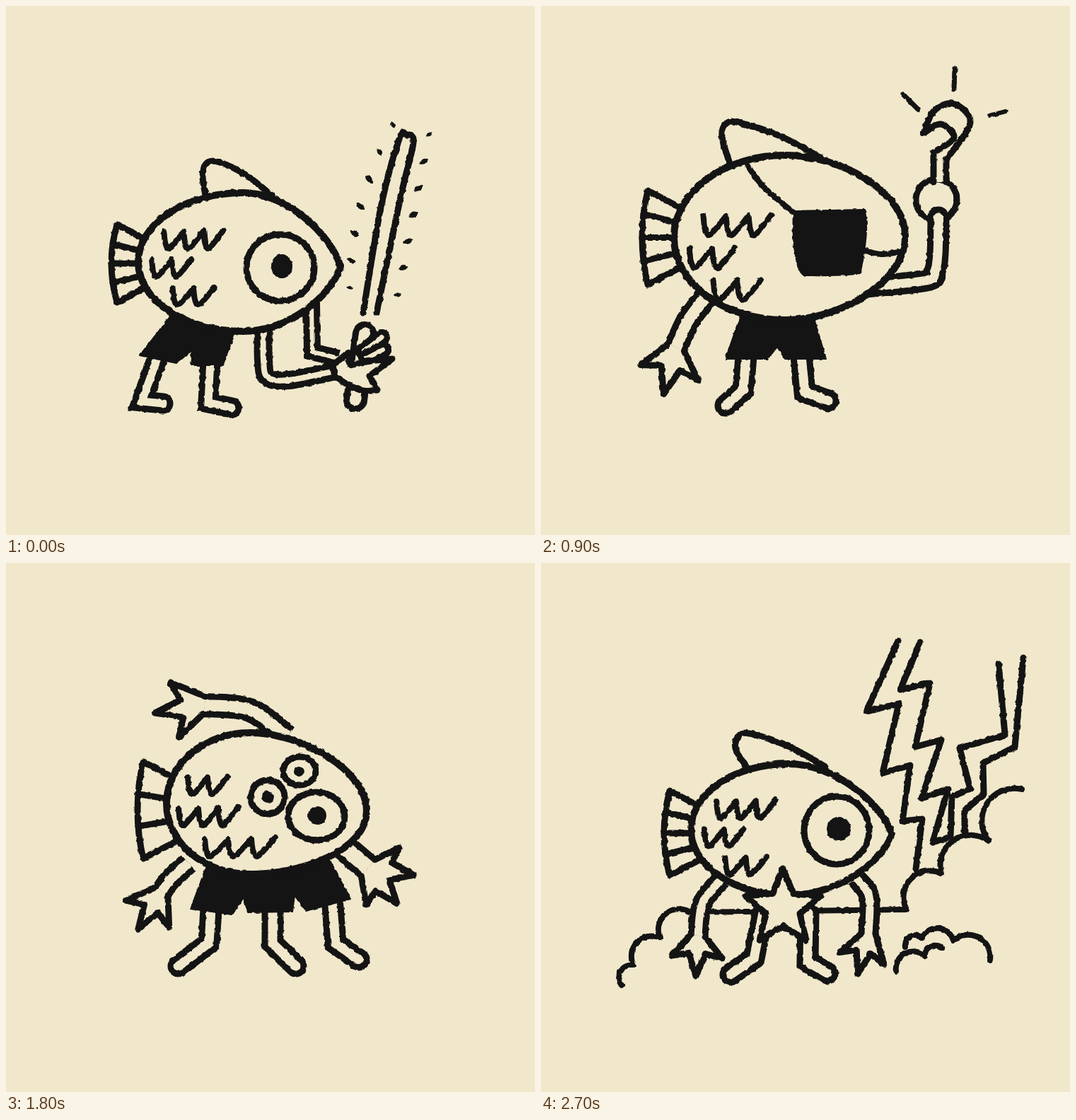
Recreate the animation shown at these times as an HTML page. Size 748 by 748 pixels, loop 3.15 s.

```html
<!DOCTYPE html>
<html lang="en">
<head>
<meta charset="utf-8">
<title>Fish poses</title>
<style>
html, body { margin: 0; width: 100%; height: 100%; overflow: hidden; background: #f1e8cc; }
svg { display: block; width: 100vw; height: 100vh; }
.pose { display: none; fill: none; stroke: #141414; stroke-width: 9; stroke-linecap: round; stroke-linejoin: round; }
</style>
</head>
<body>
<svg viewBox="0 0 748 748">
  <filter id="rough" filterUnits="userSpaceOnUse" x="0" y="0" width="748" height="748" color-interpolation-filters="sRGB">
    <feTurbulence type="fractalNoise" baseFrequency="0.17" numOctaves="1" seed="4"/>
    <feDisplacementMap in="SourceGraphic" scale="4" xChannelSelector="R" yChannelSelector="G"/>
  </filter>
  <g id="poses" filter="url(#rough)"></g>
</svg>
<script>
const HOLD = 450, INK = '#141414', PAPER = '#f1e8cc', LINE = 9;
const NS = 'http://www.w3.org/2000/svg';
const root = document.getElementById('poses');
const poses = [];
let group;

function add(tag, attrs) {
  const el = document.createElementNS(NS, tag);
  for (const k in attrs) el.setAttribute(k, attrs[k]);
  group.append(el);
}

const polar = (x, y, r, deg) => {
  const a = deg * Math.PI / 180;
  return [x + r * Math.cos(a), y + r * Math.sin(a)];
};
const corners = pts => pts.map(p => p.join() + '!').join(' ');

// Smooth path through points; "!" marks a sharp corner, a final "z" closes it.
function curve(text) {
  const words = text.split(' ');
  const closed = words[words.length - 1] === 'z';
  if (closed) words.pop();
  const pts = words.map(w => {
    const [x, y] = w.split(',').map(parseFloat);
    return { x, y, sharp: w.endsWith('!') };
  });
  const n = pts.length;
  const at = i => closed ? pts[(i + n) % n] : pts[Math.max(0, Math.min(n - 1, i))];
  let d = `M${pts[0].x} ${pts[0].y}`;
  for (let i = 0; i < (closed ? n : n - 1); i++) {
    const b = at(i), c = at(i + 1);
    const a = b.sharp ? b : at(i - 1), e = c.sharp ? c : at(i + 2);
    d += `C${b.x + (c.x - a.x) / 6} ${b.y + (c.y - a.y) / 6} ` +
      `${c.x - (e.x - b.x) / 6} ${c.y - (e.y - b.y) / 6} ${c.x} ${c.y}`;
  }
  return closed ? d + 'Z' : d;
}

const path = (d, width = LINE, fill = 'none') => add('path', { d, fill, 'stroke-width': width });
const ink = (text, width) => path(curve(text), width);
const shape = text => path(curve(text), LINE, PAPER);
const solid = text => path(curve(text), 2, INK);

// Hollow limb: a wide ink line with a narrower paper line inside.
function tube(text, w = 22, cap = 'round') {
  const d = curve(text);
  for (const [stroke, width] of [[INK, w + LINE], [PAPER, w - LINE]])
    add('path', { d, stroke, 'stroke-width': width, 'stroke-linecap': cap, 'stroke-linejoin': 'miter' });
}

function arm(text, r, dir, { w = 22, spread = 45, fingers = 3 } = {}) {
  tube(text, w, 'butt');
  const [[ax, ay], [x, y]] = text.split(' ').slice(-2).map(p => p.split(',').map(parseFloat));
  const heading = Math.atan2(y - ay, x - ax) * 180 / Math.PI;
  const pts = [polar(x, y, w / 2, heading + 90)];
  for (let i = 0; i < 2 * fingers - 1; i++) {
    const off = fingers - 1 - i;
    const reach = i % 2 ? 0.53 : 1.1 - 0.1 * Math.abs(off);
    pts.push(polar(x, y, r * reach, dir + off * spread / 2));
  }
  pts.push(polar(x, y, w / 2, heading - 90));
  shape(corners(pts));
}

function waves(x, y, step, n, h, width = 8) {
  let text = `${x},${y}`;
  for (let i = 0; i < n; i++, x += step)
    text += ` ${x + step * 0.08},${y + h * 0.75} ${x + step * 0.3},${y + h} ${x + step},${y - i}!`;
  ink(text, width);
}

function tail(x, top, bottom, rays = 3) {
  const half = (bottom - top) / 2, mid = top + half, hub = x + 1.9 * half;
  path(`M${hub} ${mid}L${x} ${top}Q${x - 16} ${mid} ${x} ${bottom}Z`);
  for (let i = 1; i <= rays; i++) {
    const t = i / (rays + 1);
    path(`M${x - 32 * t * (1 - t)} ${top + 2 * half * t}L${hub} ${mid}`);
  }
}

function fin(bx, by, px, py, ex, ey) {
  ink(`${bx},${by} ${px},${py + 20} ${px + 6},${py + 1} ${px + 24},${py} ` +
    `${(px + ex) / 2 + 12},${py * 0.62 + ey * 0.38} ${ex},${ey}`);
}

// Half ellipse behind `top`, tapering to the nose in front of it.
function body([x0, y0, x1, y1], top, nose, blunt) {
  const w = x1 - x0, h = y1 - y0, mid = (y0 + y1) / 2, k = 0.448;
  const bx = x0 + (top - x0) * k, fx = top + (x1 - top) * 0.45;
  const nx = blunt ? x1 : x1 - w * 0.05, ny = h * (blunt ? 0.28 : 0.23);
  path(`M${x0} ${mid}C${x0} ${y0 + h / 2 * k} ${bx} ${y0} ${top} ${y0}` +
    `C${fx} ${y0} ${nx} ${nose - ny} ${x1} ${nose}` +
    `C${nx} ${nose + ny} ${fx} ${y1} ${top} ${y1}` +
    `C${bx} ${y1} ${x0} ${y1 - h / 2 * k} ${x0} ${mid}Z`, 10, PAPER);
}

function fish(box, top, nose, scalesY, blunt) {
  body(box, top, nose, blunt);
  const x = box[0], w = box[2] - x, gap = w * 0.14, h = w * 0.08;
  waves(x + w * 0.127, scalesY, w * 0.098, 3, h);
  waves(x + w * 0.067, scalesY + gap, w * 0.098, 2, h);
  waves(x + w * 0.17, scalesY + 2 * gap, w * 0.103, 2, h);
}

function eye(cx, cy, rx, ry, px, py, prx, pry = prx) {
  add('ellipse', { cx, cy, rx, ry });
  add('ellipse', { cx: px, cy: py, rx: prx, ry: pry, fill: INK, 'stroke-width': 2 });
}

function spark(x, y, len, deg) {
  add('path', {
    d: `M${-len / 2} 0Q0 ${-len / 2} ${len / 2} 0Q0 ${len / 2} ${-len / 2} 0Z`,
    transform: `translate(${x} ${y}) rotate(${deg})`, fill: INK, 'stroke-width': 1
  });
}

// Row of cloud bumps, one arc between each pair of points.
function cloud(text) {
  const pts = text.split(' ').map(p => p.split(',').map(Number));
  path(pts.reduce((d, [x, y], i) => {
    if (!i) return `M${x} ${y}`;
    const r = Math.hypot(x - pts[i - 1][0], y - pts[i - 1][1]) * 0.53;
    return `${d}A${r} ${r} 0 0 1 ${x} ${y}`;
  }, ''), 8);
}

function star(x, y, r) {
  const pts = Array.from({ length: 10 }, (_, i) => polar(x, y, i % 2 ? r * 0.45 : r, i * 36 - 90));
  shape(corners(pts) + ' z');
}

function shoe(dx, dy) {
  const at = text => text.replace(/(\d+),(\d+)/g, (_, x, y) => `${+x + dx},${+y + dy}`);
  solid(at('334,508! 311,545 318,622! 338,588! 370,634 394,628 382,560 357,512! z'));
  add('path', { d: curve(at('346,506 347,535 354,556')), stroke: PAPER, 'stroke-width': 21 });
  tube(at('346,290 347,400 346,512'), 23, 'butt');
}

function pose(draw) {
  group = document.createElementNS(NS, 'g');
  group.setAttribute('class', 'pose');
  root.append(group);
  poses.push(group);
  draw();
}

// Glowing sword
pose(() => {
  tail(157, 309, 419);
  fin(283, 272, 278, 221, 376, 268);
  tube('214,498 192,559! 222,562', 20);
  tube('289,500 286,561! 319,568', 20);
  solid('236,434! 189,494! 241,505! 263,487! 261,508! 307,508! 326,455! z');
  tube('432,420 433,489! 470,498', 15, 'butt');
  tube('364,450 364,500 370,525 400,529 466,516', 17, 'butt');
  fish([187, 264, 473, 460], 335, 368, 319);
  eye(388, 370, 48, 47, 390, 368, 14, 16);
  tube('507,463 494,557', 25);
  tube('506,488 531,469', 15);
  tube('510,498 533,486', 15);
  shape('465,524! 462,508! 484,490! 486,508! 515,502 546,499! 514,523! 525,543! 505,544 483,535 z');
  ink('505,434 530,285 556,188 566,182 576,193 558,270 524,434');
  for (let i = 0; i < 7; i++) {
    const t = i / 6, len = 9 + 5 * Math.sin(Math.PI * t);
    spark(486 + 61 * t * t, 398 - 230 * t, len, 15 + 50 * t);
    spark(554 + 44 * t, 408 - 226 * t, len, -10 - 30 * t);
  }
});

// Merfolk
pose(() => {
  tail(254, 187, 313);
  fin(357, 178, 350, 124, 459, 170);
  shape('259,556 256,500 263,452! 284,500 296,556');
  shape('262,556 225,577 188,622! 250,613 298,589');
  shape('375,360! 372,480 345,545 278,560! 310,594 355,606 445,575 492,475 498,340! z');
  for (let i = 0; i < 6; i++)
    waves(391 - 1.9 * i * i, 393 + 34 * i, 22, i % 2 && i < 5 ? 1 : 2, 18);
  fish([286, 169, 560, 366], 417, 264, 228);
  eye(476, 267, 46, 48, 478, 265, 12, 16);
});

// Pirate
pose(() => {
  tail(151, 261, 394);
  fin(268, 226, 256, 165, 395, 214);
  tube('290,495 286,543! 261,565');
  tube('368,495 373,546! 406,558');
  solid('283,435! 261,499! 320,499! 334,482! 345,499! 403,499! 384,435! z');
  arm('236,408 208,445 191,483', 62, 105, { w: 25, spread: 49 });
  add('circle', { cx: 559, cy: 274, r: 29 });
  shape('555,249! 555,207! 584,186 565,167 541,180! 555,149 583,138 607,165 573,217! 573,249!');
  tube('450,398 545,388 557,375 561,350 562,299');
  fish([188, 211, 515, 444], 345, 326, 297, true);
  ink('292,226 315,256 358,293', 8);
  ink('455,345 480,351 506,348', 8);
  solid('357,296 363,290 410,289 458,288! 460,320 453,370 445,379 385,381 367,376 358,340 z');
  ink('585,88 584,118', 7);
  ink('512,125 533,146', 7);
  ink('634,155 657,149', 6);
});

// High heels
pose(() => {
  tail(239, 189, 289);
  fin(337, 156, 331, 115, 411, 158);
  arm('299,288 282,315 268,338', 49, 110, { w: 20, spread: 42 });
  arm('465,270 478,298 483,324', 49, 85, { w: 22, spread: 40 });
  shoe(0, 0);
  shoe(68, -8);
  fish([270, 152, 487, 304], 370, 240, 202);
  eye(414, 232, 41, 41, 415, 234, 11, 12);
});

// Three of everything
pose(() => {
  tail(194, 281, 418, 2);
  tube('290,490 287,537! 244,570');
  tube('377,490 377,538! 410,570');
  tube('462,485 466,538! 499,561');
  solid('283,430! 261,489! 320,497! 336,473! 342,494! 405,493! 408,470! 424,492! 487,475! 455,415! z');
  arm('398,246 345,208 280,201', 64, 171, { w: 25, spread: 43 });
  arm('258,424 232,448 220,465', 57, 122, { spread: 44 });
  arm('478,402 512,431', 65, 30, { w: 30, spread: 42, fingers: 4 });
  body([227, 240, 510, 440], 345, 350, true);
  waves(257, 303, 28, 2, 23);
  waves(244, 347, 28, 3, 23);
  waves(281, 391, 33, 3, 23);
  eye(415, 294, 23, 20, 414, 295, 6);
  eye(370, 331, 24, 24, 370, 331, 8);
  eye(439, 358, 40, 34, 440, 357, 12);
});

// Splashing drink
pose(() => {
  tail(202, 288, 424);
  fin(305, 252, 295, 200, 430, 249);
  tube('360,500 363,551! 400,539', 22, 'butt');
  shape('402,549! 420,590! 431,523! 397,530!');
  tube('455,437 510,428! 512,468', 22, 'butt');
  shape('524,460! 554,481! 498,506! 501,468!');
  solid('347,445! 327,503! 390,505! 400,472! 457,467! 475,425! z');
  shape('466,190! 440,188 419,180! 424,142 440,120 462,112! 518,152 505,186!');
  tube('508,294 538,250 541,235 507,190', 24, 'butt');
  shape('496,197! 466,212! 466,185 490,140! 492,172 507,187!');
  ink('461,125 464,145 456,172 447,175 445,163 452,152', 8);
  ink('451,98 420,58 395,60 375,78 366,105! 387,99! 387,124! 405,109 434,105', 8);
  ink('407,135! 385,140 368,158 370,168 385,166 398,152 z', 8);
  arm('268,430 240,470 238,498 262,524', 52, 36, { w: 24, spread: 55 });
  fish([230, 240, 537, 448], 375, 350, 306);
  eye(450, 348, 52, 54, 450, 348, 19);
});

// Star in a thunderstorm
pose(() => {
  ink('210,494 516,490', 8);
  cloud('114,597 131,569 168,530 210,493');
  cloud('516,488 566,439 633,393 680,320');
  cloud('502,577 543,556 567,545');
  cloud('515,543 539,530 583,534 635,562');
  ink('505,110! 460,210! 506,199! 483,297! 522,286! 511,365! 539,362! 530,433!');
  ink('536,112! 508,179! 550,170! 529,260! 566,250! 538,333! 575,320! 554,395!');
  ink('554,395! 579,387! 581,330! 607,320! 592,262! 656,243! 647,143!');
  ink('682,134! 670,260! 625,283! 626,327! 599,350! 599,380!');
  tail(182, 322, 442);
  fin(293, 292, 275, 242, 402, 288);
  tube('314,495 301,559! 268,582');
  tube('378,495 377,564! 405,580');
  arm('254,448 228,482 222,527', 52, 93, { w: 20, spread: 50 });
  arm('446,446 464,472 463,524', 54, 105, { w: 20, spread: 42 });
  fish([212, 284, 496, 470], 350, 383, 337);
  star(342, 488, 56);
  eye(418, 378, 46, 48, 421, 376, 16);
});

let shown = -1;
function render(ms) {
  const next = Math.floor(ms / HOLD) % poses.length;
  if (next === shown) return;
  shown = next;
  poses.forEach((g, i) => { g.style.display = i === next ? 'inline' : 'none'; });
}

const start = performance.now();
function loop() {
  render(performance.now() - start);
  requestAnimationFrame(loop);
}
loop();
</script>
</body>
</html>
```
